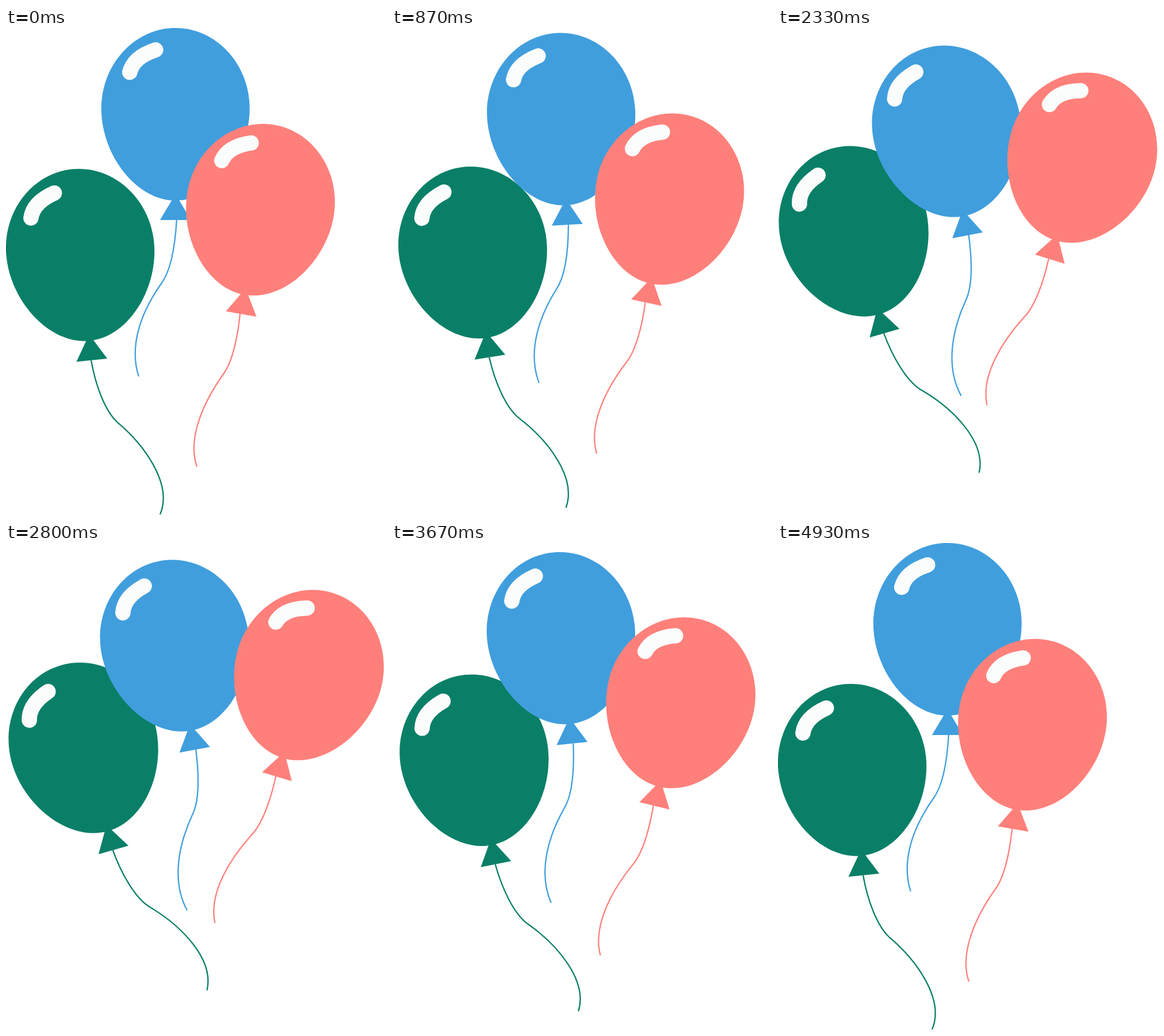
An HTML page for the animation above (4.99 s loop, 661x847 px).

```html
<!DOCTYPE html>
<html lang="en">
<head>
<meta charset="utf-8">
<title>Balloons</title>
<style>
  html, body { margin: 0; width: 100%; height: 100%; overflow: hidden; background: #fff; }
  svg { display: block; width: 100%; height: 100%; }
</style>
</head>
<body>
<svg id="stage" viewBox="0 0 661 847"></svg>
<script>
const LOOP = 4990;
const STEPS = 75;
const PEAK = (STEPS - 1) / 2;

// Shared shapes, drawn around the centre of the balloon.
const BODY = 'M0-150C71-150 129-87 129-10C129 70 69 150 0 150C-69 150-129 70-129-10C-129-87-71-150 0-150Z';
const KNOT = 'M0 139L27 184L-27 184Z';
const SHINE = 'M-79.5-73Q-73-99.5-34.5-112';

// rise and fall hold the two inner control points of each flight curve.
const balloons = [
  {
    color: '#0a7f67',
    string: 'M-1.3 184C2 228.7 13.4 273.1 32.2 295.2C77.6 342.2 117.2 414.7 90 463.1',
    home: [130.1, 394.8], tilt: -6, swing: -10.3, reach: [3.4, -41.2],
    rise: [[16.8, 2.8], [24.9, -25.4]],
    fall: [[8, -9], [28.8, -19.6]]
  },
  {
    color: '#409edd',
    string: 'M2 184C-1 235-10 275-25 295C-57 340-82 400-64 456',
    home: [294.8, 150], tilt: 0, swing: -11.05, reach: [0, 30.2],
    rise: [[0, 10], [0, 20]],
    fall: [[0, 10], [0, 20]]
  },
  {
    color: '#ff807b',
    string: 'M-2 184C1.4 227-1.1 270.1-12.4 292.4C-36.1 342.3-56 411.5-29.7 458.9',
    home: [441, 316.2], tilt: 10, swing: 7.15, reach: [85.6, -91],
    rise: [[49.8, -15.9], [93.6, -54.4]],
    fall: [[53.7, -7.2], [71.6, -57.8]]
  }
];

const stage = document.getElementById('stage');

function add(parent, tag, attrs) {
  const node = document.createElementNS('http://www.w3.org/2000/svg', tag);
  for (const key in attrs) node.setAttribute(key, attrs[key]);
  return parent.appendChild(node);
}

for (const b of balloons) {
  b.node = add(stage, 'g', { fill: b.color });
  add(b.node, 'path', { d: b.string, fill: 'none', stroke: b.color, 'stroke-width': 2.3 });
  add(b.node, 'path', { d: KNOT });
  add(b.node, 'path', { d: BODY });
  add(b.node, 'path', {
    d: SHINE, fill: 'none', stroke: '#fbfdfc', 'stroke-width': 26.6, 'stroke-linecap': 'round'
  });
}

const smooth = x => x * x * (3 - 2 * x);

// Cubic curve that starts at zero.
const curve = (a, b, c, u) =>
  3 * u * (1 - u) ** 2 * a + 3 * u * u * (1 - u) * b + u ** 3 * c;

function draw(time) {
  const step = Math.floor((time % LOOP + 5) / LOOP * STEPS) % STEPS;
  const p = smooth(1 - Math.abs(step - PEAK) / PEAK);
  for (const b of balloons) {
    const [c1, c2] = step < PEAK ? b.rise : b.fall;
    const [x, y] = b.home.map((h, i) => h + curve(c1[i], c2[i], b.reach[i], p));
    const angle = b.tilt + b.swing * p;
    b.node.setAttribute('transform',
      `translate(${x.toFixed(2)} ${y.toFixed(2)}) rotate(${angle.toFixed(3)})`);
  }
}

const start = performance.now();
function tick() {
  draw(performance.now() - start);
  requestAnimationFrame(tick);
}
tick();
</script>
</body>
</html>
```
